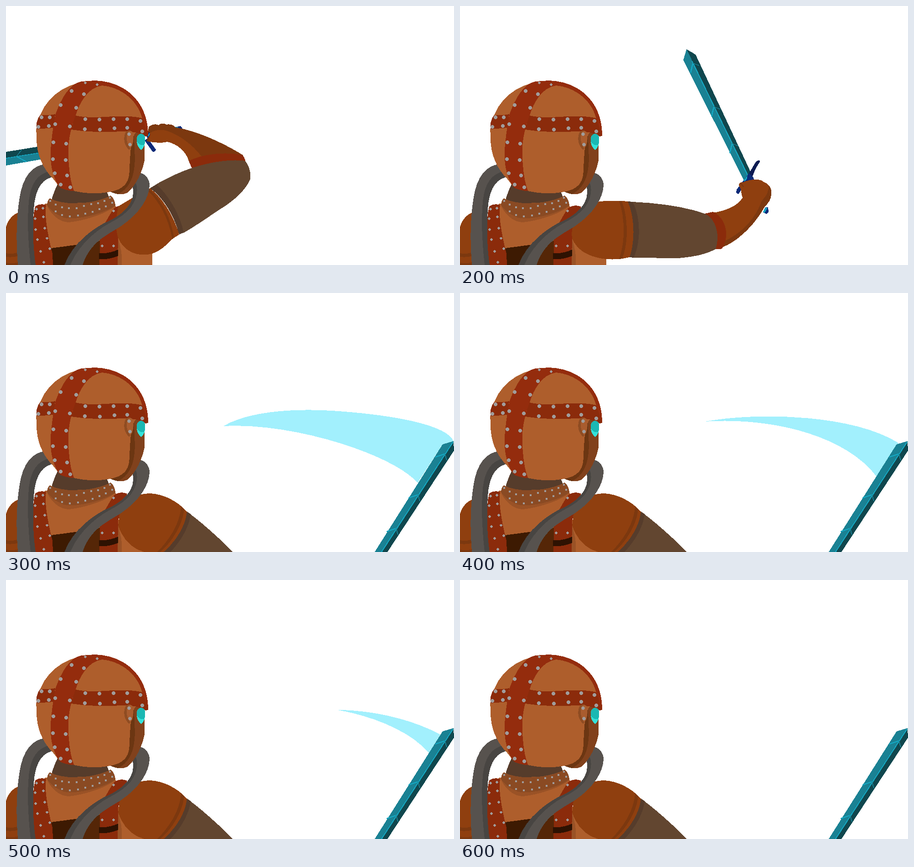
Write an HTML page that moves like this. It is 983 px wide and 570 px high and loops after 0.7 s.

```html
<!DOCTYPE html>
<html lang="en">
<head>
<meta charset="utf-8">
<title>Sword swing</title>
<style>
  html, body { margin: 0; width: 100%; height: 100%; overflow: hidden; background: #fff; }
  svg { display: block; width: 100vw; height: 100vh; }
</style>
</head>
<body>
<svg id="stage" viewBox="0 0 983 570" shape-rendering="crispEdges"></svg>
<script>
const NS = "http://www.w3.org/2000/svg";
const stage = document.getElementById("stage");

const C = {
  skin: "#ae5e2c", skinDark: "#9a5226", face: "#81411c", faceDark: "#6c3612",
  strap: "#942c0d", band: "#8b2b0b", stud: "#a09c9b",
  hose: "#57524e", hoseDark: "#484542", neck: "#563c2b", collar: "#8a4a23",
  arm: "#8f3f0f", armDark: "#7c380f", sleeve: "#624630",
  blade: "#1a8193", bladeDark: "#10474e", edge: "#14a9c4",
  navy: "#0c2a78", navyDark: "#0c1b52", trail: "#a2f0fd"
};

function add(parent, tag, attrs) {
  const el = document.createElementNS(NS, tag);
  for (const k in attrs) el.setAttribute(k, attrs[k]);
  parent.appendChild(el);
  return el;
}
const group = () => add(stage, "g", {});
const shape = (g, fill, d) => add(g, "path", { fill, d });
const line = (g, stroke, d, width = 2) =>
  add(g, "path", { fill: "none", stroke, d, "stroke-width": width });
function studs(g, r, points) {
  for (const [cx, cy] of points) add(g, "circle", { cx, cy, r, fill: C.stud });
}

// Things behind the body
const reach = group(), trails = [group(), group(), group()], lowBlade = group();
const torso = group();
const arms = [group(), group(), group()];
const front = group();

function drawReach(g) {
  shape(g, C.bladeDark, "M0 321 L80 308 V323 L0 336Z");
  shape(g, C.blade, "M0 335 L80 322 V337 L0 351Z");
  line(g, C.edge, "M0 335 L80 322", 1.5);
  line(g, C.edge, "M23 331 L45 343");
  line(g, C.blade, "M23 331 L34 317", 1.5);
  shape(g, C.navy, "M304 296 L311 291 L329 316 L327 320 L322 321Z");
  shape(g, C.navy, "M371 267 L383 264 L387 269 L380 273Z");
  shape(g, C.edge, "M370 266 L377 267 L381 271 L374 269Z");
  shape(g, C.armDark, "M401 341 C395 320 375 303 354 299 C345 302 325 301 309 298 L313 266 C320 260 328 259 335 262 C340 257 349 258 352 261 C360 259 368 262 372 267 C425 276 487 307 521 329 C480 322 430 326 401 341Z");
  shape(g, C.arm, "M401 341 C395 320 375 303 354 299 C345 302 325 301 313 298 L317 279 C327 272 343 271 354 275 C382 285 408 304 429 331Z");
  shape(g, C.navy, "M309 286 L314 276 L316 284 L310 292Z");
  line(g, C.edge, "M312 287 L315 280", 2);
}

function drawTrails() {
  [
    "M477 293 C525 264 615 253 715 259 C825 266 965 286 982 326 L958 333 L903 418 C855 359 635 284 477 293Z",
    "M537 283 C650 262 860 266 962 330 L914 404 C845 312 680 273 537 283Z",
    "M727 286 C800 286 888 305 953 340 L928 381 C888 332 800 298 727 286Z"
  ].forEach((d, i) => shape(trails[i], C.trail, d));
}

function drawLowBlade(g) {
  shape(g, C.bladeDark, "M982 326 L983 347 L837 570 L822 570Z");
  shape(g, C.blade, "M958 333 L982 326 L824 570 L809 570Z");
  line(g, C.edge, "M981 328 L824 570");
  for (const [x, y] of [[963, 354], [904, 444], [856, 518]]) {
    line(g, C.edge, `M${x - 21} ${y + 7} L${x} ${y}`, 2.5);
    line(g, C.blade, `M${x} ${y} l4 14`, 2);
  }
}

function drawTorso(g) {
  shape(g, C.arm, "M34 452 C13 457 3 474 0 487 V570 H34Z");
  shape(g, C.armDark, "M0 544 C10 546 20 545 28 542 V550 C18 553 8 553 0 552Z M0 565 C10 567 20 566 28 564 V570 H0Z");
  shape(g, C.skin, "M85 435 L240 435 L247 500 H300 L321 545 V570 H85Z");
  shape(g, C.skinDark, "M246 512 C251 530 256 546 254 570 H245Z");
  shape(g, "#3d1a02", "M99 533 C130 529 160 525 205 518 V570 H101Z");
  shape(g, "#552607", "M153 527 L207 516 V570 H150Z");
  shape(g, C.band, "M64 441 C70 436 80 435 88 438 C84 460 91 502 102 545 L103 570 H65 C58 530 56 475 64 441Z");
  shape(g, C.band, "M234 449 C238 440 255 436 266 442 L246 500 L245 570 H205 L207 495Z");
  shape(g, "#2e1202", "M204 544 C220 545 234 542 246 536 V550 C232 556 218 558 204 557Z");
  studs(g, 2.6, [[67, 447], [81, 445], [64, 468], [82, 464], [65, 492], [85, 489],
    [69, 514], [90, 511], [76, 540], [96, 534], [83, 564], [236, 451], [211, 528], [236, 528]]);
}

function drawArmUp(g) {
  shape(g, C.arm, "M246 441 C268 428 295 411 316 401 C341 420 367 458 380 503 L366 512 C352 527 335 541 321 545 C290 553 258 542 245 508 L240 480Z");
  shape(g, C.armDark, "M309 404 C339 432 357 470 365 513 L369 510 C362 470 345 430 314 402Z");
  shape(g, C.band, "M401 341 C430 326 480 320 519 328 C524 334 526 340 526 350 L410 362Z");
  shape(g, C.neck, "M316 401 L331 392 C359 418 383 458 391 498 L380 503 C368 458 343 420 316 401Z");
  shape(g, C.sleeve, "M330 392 C355 378 380 366 406 357 C445 344 490 336 525 341 C534 352 538 368 536 381 C528 402 502 428 470 447 C440 467 415 485 390 499 C382 460 358 418 330 392Z");
}

function drawArmOut(g) {
  // sword
  shape(g, C.bladeDark, "M497 95 L517 107 L646 383 L633 386Z");
  shape(g, C.blade, "M497 95 L635 377 L624 386 L490 119Z");
  line(g, C.edge, "M509 121 L634 378", 2);
  for (const [x, y] of [[511, 126], [557, 222], [597, 303]]) {
    line(g, C.edge, `M${x} ${y} l-5 21`, 2.5);
    line(g, C.blade, `M${x} ${y} l14 5`, 1.5);
  }
  shape(g, C.navy, "M628 386 L643 376 L646 384 L632 397Z");
  shape(g, C.navyDark, "M657 339 L651 341 C645 348 640 360 633 370 L641 377 C646 363 652 351 658 343Z");
  shape(g, C.navy, "M634 368 L607 404 L606 411 L611 414 L617 405 L642 375Z");
  shape(g, C.edge, "M623 383 L631 373 L629 382 L624 386Z");
  shape(g, C.navy, "M665 454 L670 443 L676 443 L677 453 L673 458Z");
  shape(g, C.edge, "M665 453 L671 443 L674 446 L668 456Z");
  // forearm and hand
  shape(g, C.arm, "M554 455 C580 452 610 440 620 422 C616 412 618 403 613 397 C610 391 615 387 621 388 C636 381 659 379 666 387 C677 390 684 401 683 413 C684 425 676 434 668 443 C651 474 617 514 578 530Z");
  shape(g, C.armDark, "M677 394 C682 400 684 406 683 413 C684 425 676 434 668 443 C651 474 617 514 577 530 L581 517 C620 499 646 468 659 437 C662 422 678 420 677 394Z");
  line(g, C.armDark, "M616 390 L622 398", 3);
  // shoulder and sleeve
  shape(g, C.arm, "M245 500 L250 468 C260 447 278 433 300 431 C320 428 345 428 370 430 C387 470 387 520 372 553 C350 558 335 558 320 557 C288 553 259 542 246 512Z");
  shape(g, C.armDark, "M349 429 C362 465 363 520 349 557 L356 556 C370 520 369 465 355 429Z");
  shape(g, C.neck, "M368 430 L380 431 C397 465 397 520 381 554 L372 553 C384 520 384 465 368 430Z");
  shape(g, C.band, "M537 457 L555 453 C583 465 593 506 575 534 Q568 537 558 534 L545 500Z");
  shape(g, C.sleeve, "M379 431 C440 434 495 442 537 457 C563 468 571 508 561 535 C540 546 520 551 480 555 L381 554 C397 520 397 465 379 431Z");
}

function drawArmDown(g) {
  shape(g, C.arm, "M246 512 L250 477 C264 455 285 442 315 441 C345 442 375 457 398 482 C394 515 372 547 348 570 H303 C275 562 257 543 246 512Z");
  shape(g, C.armDark, "M384 470 C382 507 358 544 332 570 H339 C367 545 388 508 391 475Z");
  shape(g, C.neck, "M397 481 L406 487 C402 517 382 548 361 570 H346 C374 545 394 513 397 481Z");
  shape(g, C.sleeve, "M405 487 C438 512 471 543 498 570 H361 C382 548 402 517 405 487Z");
}

function drawHoses(g) {
  shape(g, C.hose, "M88 348 C56 350 37 378 30 420 C22 470 22 520 26 570 H65 C59 530 58 478 62 435 C67 400 80 379 108 375Z");
  shape(g, C.hoseDark, "M99 363 C67 369 54 393 50 430 C46 475 49 525 54 570 H65 C59 530 58 478 62 435 C67 400 80 379 108 375Z");
  shape(g, C.hose, "M290 367 C305 367 315 380 315 395 C314 424 291 460 247 488 C215 507 184 523 168 570 H128 C144 530 174 501 215 478 C252 463 280 438 279 410 C279 402 278 396 275 391Z");
  shape(g, C.hoseDark, "M275 391 L284 388 C291 402 288 424 274 443 C260 460 244 469 225 479 C195 496 158 528 141 570 H128 C144 530 174 501 215 478 C252 463 280 438 279 410 C279 402 278 396 275 391Z");
}

function drawNeck(g) {
  shape(g, C.neck, "M114 390 C107 405 102 418 99 430 C140 444 200 436 226 420 L219 404Z");
  shape(g, C.skinDark, "M89 437 C97 457 117 477 139 476 C180 471 220 456 241 440 L225 430Z");
  shape(g, C.collar, "M96 423 C128 441 195 436 230 417 C236 422 239 430 240 439 C210 459 158 471 127 466 C108 458 93 446 90 437 C91 431 92 427 96 423Z");
  studs(g, 2.5, [[97, 429], [109, 437], [123, 443], [138, 445], [155, 445], [171, 440],
    [187, 436], [202, 434], [216, 429], [228, 422], [109, 452], [123, 460], [140, 463],
    [158, 461], [174, 457], [190, 453], [205, 447], [219, 441], [233, 433]]);
}

function drawHead(g) {
  // face
  shape(g, C.face, "M268 270 L304 280 V340 C300 362 285 397 266 411 C255 417 240 414 229 408 L262 380Z");
  shape(g, C.faceDark, "M268 270 L282 278 C279 300 285 325 282 350 C280 380 268 403 246 414 Q236 413 229 408 L262 380Z");
  // skull
  shape(g, C.skin, "M195 164 C252 166 298 205 306 262 L282 281 C273 302 272 330 271 360 C271 386 262 400 237 407 C205 415 175 413 149 407 L119 400 L104 381 C80 357 66 325 67 286 C65 262 68 250 77 236 C94 194 141 165 195 164Z");
  // bands
  shape(g, C.band, "M74 241 C85 239 97 241 108 238 L104 268 C92 269 80 270 67 271 C65 259 69 248 74 241Z");
  shape(g, C.band, "M152 241 C180 247 205 245 235 243 C262 242 285 243 299 247 C307 257 312 270 312 286 L306 287 C288 275 262 275 235 277 C200 278 170 276 143 272Z");
  shape(g, C.strap, "M195 164 C266 166 313 216 312 286 L299 248 C290 210 255 179 211 175 C181 179 162 210 152 243 C138 280 134 312 138 350 C140 375 143 390 149 407 C138 407 127 404 119 400 C103 381 96 348 98 315 C101 285 104 258 109 237 C122 202 140 171 165 166Z");
  studs(g, 3.8, [[144, 187], [171, 194], [120, 218], [154, 224], [108, 260], [140, 265],
    [104, 300], [132, 303], [103, 337], [131, 339], [107, 368], [134, 373], [120, 393], [141, 399]]);
  studs(g, 2.6, [[174, 169], [200, 173]]);
  studs(g, 3.8, [[78, 245], [96, 245], [71, 266], [94, 264], [174, 249], [205, 250],
    [236, 249], [266, 249], [295, 253], [173, 271], [206, 272], [238, 269], [266, 268], [299, 276]]);
  // ear
  shape(g, "#8f4c22", "M264 276 C257 284 257 306 270 316 C279 310 282 290 278 278 C275 273 267 273 264 276Z");
  shape(g, "#a95c2e", "M267 278 C263 288 264 303 273 314 C279 307 281 290 278 278 C275 274 270 274 267 278Z");
  studs(g, 3.6, [[270, 282], [272, 305]]);
  // eye
  shape(g, "#33e3db", "M292 282 C298 280 305 282 305 290 C307 300 303 313 297 317 C289 312 284 298 288 287Z");
  shape(g, "#1bb8b3", "M292 282 C298 280 305 282 305 290 C306 297 305 303 303 306 C297 308 290 304 287 298 C286 293 288 285 292 282Z");
}

drawReach(reach);
drawTrails();
drawLowBlade(lowBlade);
drawTorso(torso);
drawArmUp(arms[0]);
drawArmOut(arms[1]);
drawArmDown(arms[2]);
drawNeck(front);
drawHoses(front);
drawHead(front);

// [start ms, visible layers]
const steps = [
  [0, [reach, arms[0]]],
  [200, [arms[1]]],
  [300, [trails[0], lowBlade, arms[2]]],
  [400, [trails[1], lowBlade, arms[2]]],
  [500, [trails[2], lowBlade, arms[2]]],
  [600, [lowBlade, arms[2]]]
];
const LOOP = 700;
const moving = [reach, lowBlade, ...trails, ...arms];

function show(time) {
  const t = time % LOOP;
  const [, layers] = steps.filter(([start]) => t >= start).pop();
  for (const g of moving) g.style.display = layers.includes(g) ? "" : "none";
}

const begin = performance.now();
function tick() {
  show(performance.now() - begin);
  requestAnimationFrame(tick);
}
show(0);
requestAnimationFrame(tick);
</script>
</body>
</html>
```
